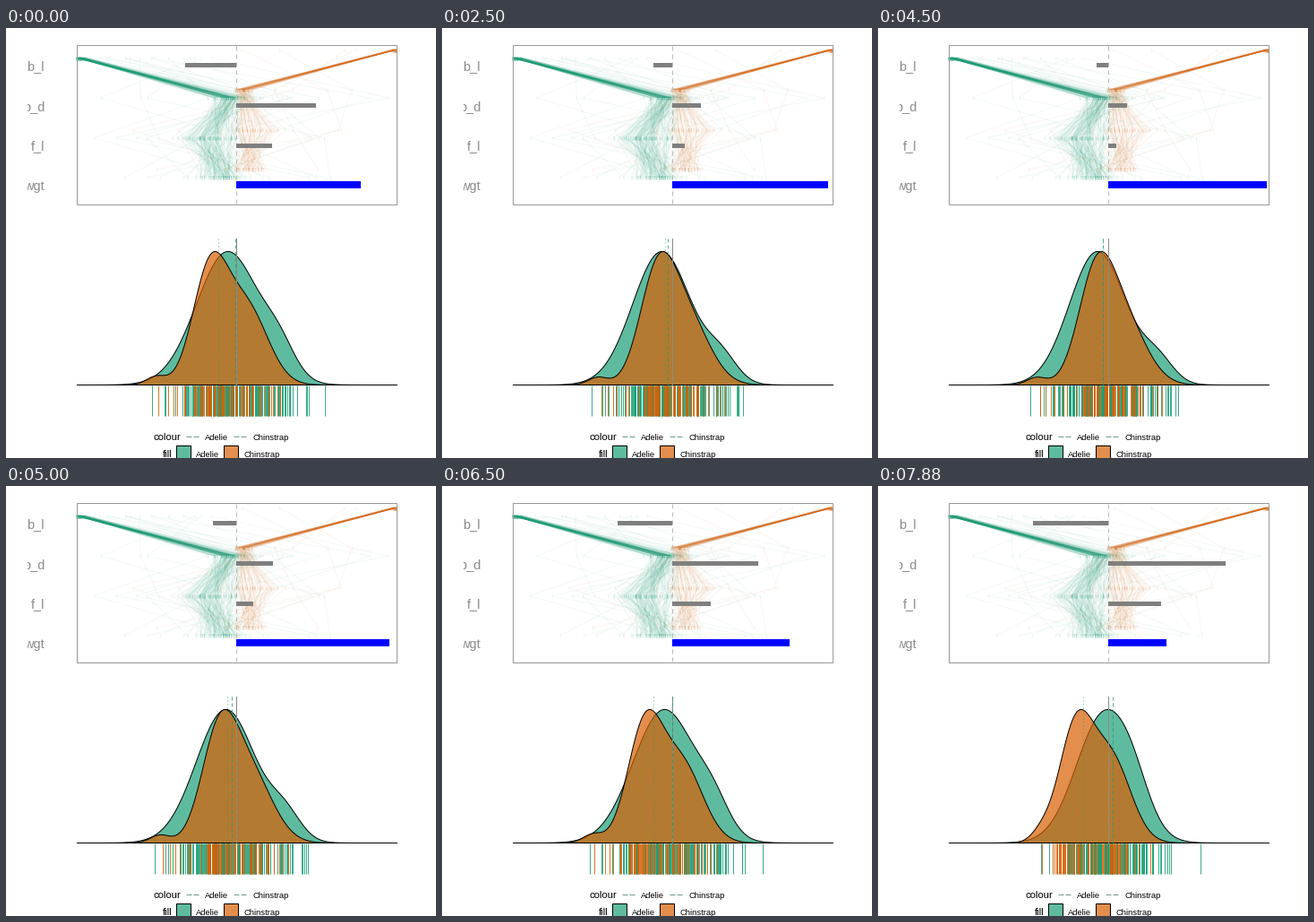
Animation of 480 by 480 pixels, one loop 8 s. Source, as a matplotlib script:

```python
import math

import numpy as np
import matplotlib.pyplot as plt
from matplotlib.animation import FuncAnimation
from matplotlib.collections import LineCollection
from matplotlib.patches import Rectangle

SIZE, DPI = 480, 100
PX = 72 / DPI
INTERVAL, FRAMES = 40, 200
GREEN, ORANGE = (27 / 255, 158 / 255, 119 / 255), (217 / 255, 95 / 255, 2 / 255)
MID, HALF = 257, 179
TOP, BASE, RUG_END = 249.5, 398.5, 433
GRID = np.arange(79, 437.5, 0.5)

# Direction in (b_l, b_d, f_l) that the tour turns to from wgt
SIDE = np.array([-0.504, 0.788, 0.354])

rng = np.random.default_rng(11)
plt.rcParams["font.family"] = "Liberation Sans"

fig = plt.figure(figsize=(SIZE / DPI, SIZE / DPI), dpi=DPI, facecolor="white")
ax = fig.add_axes([0, 0, 1, 1])
ax.set(xlim=(0, SIZE), ylim=(SIZE, 0))
ax.axis("off")


def tour_angle(t):
    """Turn onto wgt in even steps, rest there, then turn away again."""
    n = max(0, (t - 1000) // 500) + (t >= 7880)
    return max(0.68 - 0.15 * n, 0, 0.148 + 0.15 * (n - 7))


def label(x, y, text, size, color="black", ha="left"):
    ax.text(x, y, text, fontsize=size * PX, color=color, ha=ha, va="baseline")


def box(x, y, w, h, **style):
    return ax.add_patch(Rectangle((x, y), w, h, **style))


def profiles(n, strays, sign, mean, spread, top, color):
    """Unit attribution vectors drawn as faint parallel coordinates."""
    v = np.column_stack([np.full(n, sign), rng.normal(mean, spread, (n, 3))])
    v[:strays] = rng.normal(0, 1, (strays, 4))
    v[:strays, 0] = sign * np.abs(v[:strays, 0])
    v /= np.linalg.norm(v, axis=1, keepdims=True)
    x = MID + HALF * v
    y = np.broadcast_to(top + 44.5 * np.arange(4), x.shape)
    ax.add_collection(LineCollection(np.stack([x, y], axis=2), colors=[color],
                                     alpha=0.055, linewidths=PX, zorder=1))
    ax.vlines(x.ravel(), y.ravel() - 2, y.ravel() + 2, colors=[color],
              alpha=0.07, lw=PX, zorder=1)


class Group:
    """A 2D normal mixture seen along one direction, as density and rug.

    Each part is (weight, mean w, mean v, sd w, sd v, correlation).
    """

    def __init__(self, parts, n, color, zorder):
        self.parts = parts
        weights = np.array([p[0] for p in parts])
        counts = np.round(n * weights / weights.sum()).astype(int)
        self.points = np.vstack([
            rng.multivariate_normal(
                [mw, mv], [[sw ** 2, r * sw * sv], [r * sw * sv, sv ** 2]], k)
            for k, (_, mw, mv, sw, sv, r) in zip(counts, parts)])
        rng.shuffle(self.points)
        self.area, = ax.fill([0, 1, 1], [0, 0, 1], fc=(*color, 0.7), ec="black",
                             lw=PX, zorder=zorder)
        self.rug = LineCollection([], colors=[color], alpha=0.85, linewidths=PX,
                                  zorder=zorder - 0.5)
        ax.add_collection(self.rug)

    def update(self, angle):
        c, s = math.cos(angle), math.sin(angle)
        h = np.zeros_like(GRID)
        for weight, mw, mv, sw, sv, r in self.parts:
            sd = math.sqrt((c * sw) ** 2 + (s * sv) ** 2 + 2 * c * s * r * sw * sv)
            z = (GRID - MID - c * mw - s * mv) / sd
            h += weight / sd * np.exp(-z * z / 2)
        h *= (BASE - TOP) / h.max()
        self.area.set_xy(np.column_stack([GRID, BASE - h]))
        x = np.floor(MID + 0.93 * (self.points @ [c, s]))
        self.rug.set_segments([[(a, BASE), (a, RUG_END)] for a in x])


class Marker:
    """Vertical line through one projected observation."""

    def __init__(self, point, dashes):
        self.point = point
        self.line, = ax.plot([MID] * 2, [235, BASE], color=GREEN, lw=PX,
                             dashes=dashes, alpha=0.75, zorder=14)

    def update(self, angle):
        w, v = self.point
        x = round(MID + w * math.cos(angle) + v * math.sin(angle))
        self.line.set_xdata([x, x])


# Upper panel
box(79, 19, 357, 178, fc="none", ec="#999999", lw=PX, zorder=6)
ax.plot([MID] * 2, [20, 197], color="#bbbbbb", lw=PX, dashes=(5, 4), zorder=2)
profiles(151, 15, -1, [-0.05, -0.16, -0.1], [0.06, 0.1, 0.09], 33.5, GREEN)
profiles(68, 5, 1, [0.04, 0.12, 0.07], [0.025, 0.09, 0.06], 24.5, ORANGE)
bars = []
for i, name in enumerate(("b_l", "b_d", "f_l", "wgt")):
    label(43, 47 + 44.7 * i, name, 14.5, "#8c8c8c", "right")
    main = name == "wgt"
    bars.append(box(MID, 171 if main else 39 + 45 * i, 1, 8 if main else 5,
                    fc="blue" if main else "#7f7f7f", ec="none", zorder=4))
box(0, 20, 24, 180, fc="white", ec="none", zorder=7)

# Lower panel
ax.plot([MID] * 2, [235, BASE], color="#8c8c84", lw=PX, zorder=13)
movers = [
    Group([(0.91, -12, 0, 29.2, 24.3, 0.7), (0.09, 54, 10, 18, 18, 0)],
          151, GREEN, 11),
    Group([(0.54, -9, -35, 20, 19, 0), (0.43, 17.5, -2.5, 25, 21, 0),
           (0.022, -73, -52, 11, 11, 0)], 68, ORANGE, 12),
    Marker((-1.7, -29.4), (1, 3)),
    Marker((-7.3, 8.2), (4, 3)),
]

# Legend
label(164.5, 460, "colour", 11.2)
label(175, 479, "fill", 11.2)
for i, (name, color) in enumerate((("Adelie", GREEN), ("Chinstrap", ORANGE))):
    x = 53 * i
    ax.plot([201 + x, 215 + x], [456] * 2, color="#6a9a8c", lw=PX, dashes=(6, 2))
    label(222 + x, 460, name, 9.4)
    box(190 + x, 466, 16, 17, fc=(*color, 0.7), ec="black", lw=PX)
    label(212 + x, 479, name, 9.4)


def update(frame):
    angle = tour_angle(frame * INTERVAL + INTERVAL / 2)
    for bar, v in zip(bars, [*(SIDE * math.sin(angle)), math.cos(angle)]):
        bar.set_width(round(HALF * v))
    for mover in movers:
        mover.update(angle)
    return []


anim = FuncAnimation(fig, update, frames=FRAMES, interval=INTERVAL,
                     repeat=True, repeat_delay=0, blit=False)
plt.show()
```
